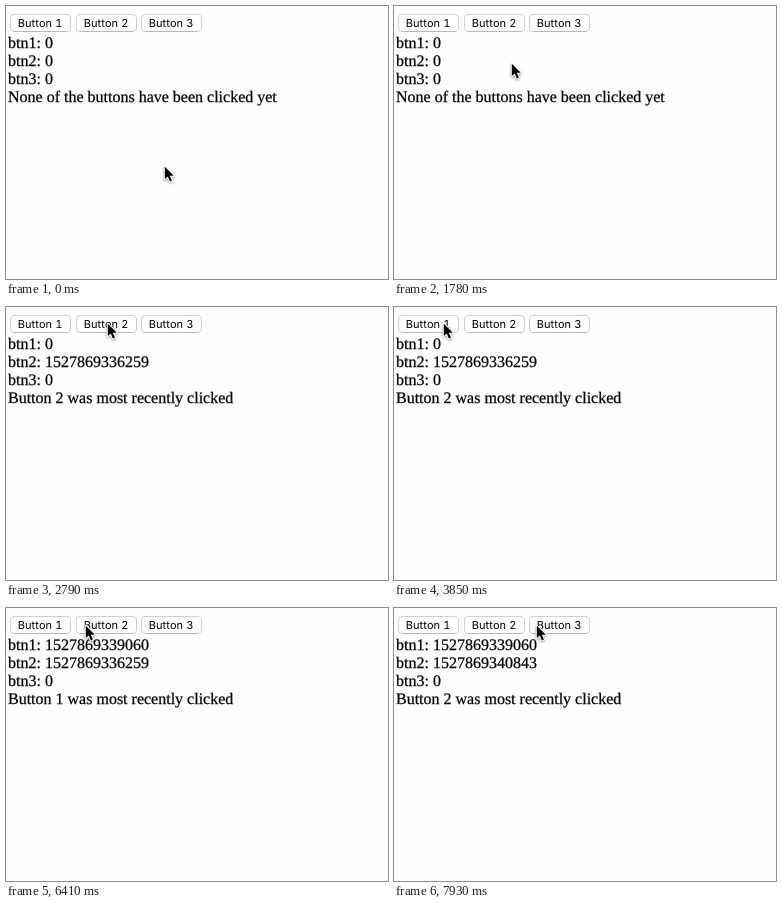
Recreate the animation shown at these times as an HTML page. Size 382 by 273 pixels, loop 8 s.

```html
<!DOCTYPE html>
<html lang="en">
<head>
<meta charset="utf-8">
<title>Button clicks</title>
<style>
  html, body { margin: 0; width: 100%; height: 100%; overflow: hidden; background: #fefefe; }
  svg { display: block; }
  text { text-rendering: geometricPrecision; }
  .line { font: 16px "Liberation Serif", serif; stroke: #000; stroke-width: .25px; }
  .button rect { fill: #fff; stroke: #d0d0d0; }
  .button path { stroke: #b8b8b8; }
  .button text { font: 11px Inter, sans-serif; font-variant-numeric: tabular-nums; letter-spacing: .01em; }
  .pressed rect { fill: url(#blue); stroke: #3f8ff0; }
  .pressed path { stroke: #0a55c4; }
  .pressed text { fill: #fff; }
  #cursor { filter: drop-shadow(0 1px 1px rgba(0, 0, 0, .4)); }
</style>
</head>
<body>
<svg width="382" height="273">
  <defs>
    <linearGradient id="blue" x2="0" y2="1">
      <stop stop-color="#6cb3fa"/>
      <stop offset="1" stop-color="#0a6ae8"/>
    </linearGradient>
  </defs>
  <g id="page"></g>
  <path id="cursor" d="M1.8 1.8V14L4.8 11.4L6.9 16.4L8.9 15.5L6.8 10.8H10.8Z"
    stroke="#fff" stroke-width="2" stroke-linejoin="round" paint-order="stroke"/>
</svg>
<script>
const LOOP = 8000;
const FRAME = 60.5;
const START = { x: 157, y: 159 };

const moves = [
  { from: 1490, to: 2190, x: 100, y: 15 },
  { from: 3680, to: 3960, x: 44, y: 15 },
  { from: 6120, to: 6570, x: 82, y: 16 },
  { from: 7710, to: 7930, x: 141, y: 16 }
];

// A click with "hold" shows the button pressed for that long before it counts
const clicks = [
  { at: 2790, button: 2, stamp: 1527869336259, hold: 60 },
  { at: 4320, button: 1, stamp: 1527869337849 },
  { at: 5520, button: 1, stamp: 1527869339060 },
  { at: 6810, button: 2, stamp: 1527869340349, hold: 60 },
  { at: 7290, button: 2, stamp: 1527869340843 }
];

const page = document.getElementById("page");
const cursor = document.getElementById("cursor");

function add(parent, tag, attributes, text = "") {
  const node = document.createElementNS("http://www.w3.org/2000/svg", tag);
  for (const name in attributes) node.setAttribute(name, attributes[name]);
  node.textContent = text;
  return parent.appendChild(node);
}

const buttons = [1, 2, 3].map(n => {
  const x = Math.round(4.2 + (n - 1) * 65.3);
  const group = add(page, "g", { class: "button" });
  add(group, "rect", { x: x + 0.5, y: 8.5, width: 60, height: 17, rx: 3.5 });
  add(group, "path", { d: `M${x + 4} 25.5h53` });
  add(group, "text", { x: x + 7.7, y: 21 }, `Button ${n}`);
  return group;
});

const lines = [0, 1, 2, 3].map(i => add(page, "text", { class: "line", x: 2, y: 42 + 18 * i }));

// Quick start, slow arrival
const ease = u => 1 - (1 - u ** 1.38) ** 3;

function pointerAt(t) {
  let { x, y } = START;
  for (const move of moves) {
    if (t < move.from) break;
    const duration = move.to - move.from;
    const gaps = Math.round(duration / FRAME);
    const step = Math.min(gaps, Math.floor((t - move.from + 1) / duration * gaps));
    const p = ease((step + 1) / (gaps + 1));
    x += (move.x - x) * p;
    y += (move.y - y) * p;
  }
  return [Math.round(x), Math.round(y)];
}

function render(t) {
  const values = [0, 0, 0];
  let message = "None of the buttons have been clicked yet";
  let pressed = 0;
  for (const { at, button, stamp, hold = 0 } of clicks) {
    if (t >= at) {
      values[button - 1] = stamp;
      message = `Button ${button} was most recently clicked`;
    } else if (t >= at - hold) {
      pressed = button;
    }
  }
  values.forEach((value, i) => lines[i].textContent = `btn${i + 1}: ${value}`);
  lines[3].textContent = message;
  buttons.forEach((group, i) => group.classList.toggle("pressed", pressed === i + 1));
  cursor.setAttribute("transform", `translate(${pointerAt(t)})`);
}

const origin = performance.now();
function tick() {
  render((performance.now() - origin) % LOOP);
  requestAnimationFrame(tick);
}
tick();
</script>
</body>
</html>
```
